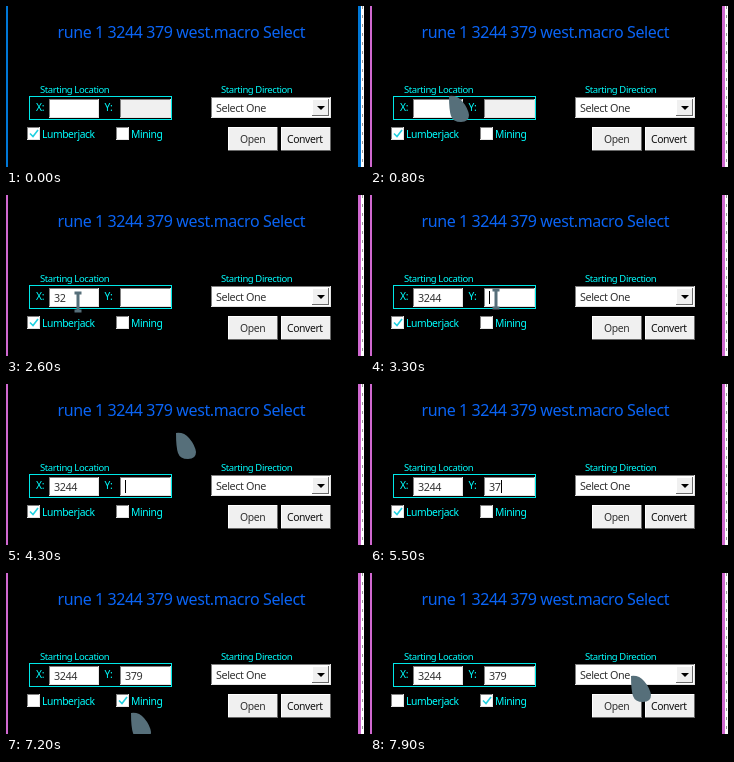
An HTML page that plays this animation: 358 by 161 pixels, repeating every 8 s.

```html
<!DOCTYPE html>
<html>
<head>
<meta charset="utf-8">
<style>
html, body { margin: 0; width: 100%; height: 100%; overflow: hidden; background: #000; }
svg { display: block; width: 358px; height: 161px; font-family: "Noto Sans", "Open Sans", sans-serif; letter-spacing: -.025em; }
rect, line, .edge { shape-rendering: crispEdges; }
.edge { fill: none; }
.label { fill: #00ffff; font-weight: 500; }
.dark { fill: #333; }
</style>
</head>
<body>
<svg viewBox="0 0 358 161">
  <rect width="358" height="161"/>
  <rect x="355" width="3" height="161" fill="#fff"/>
  <line x1="356.5" y1="0" x2="356.5" y2="161" stroke="#999" stroke-dasharray="3 6"/>
  <g id="border"><rect width="2" height="161"/><rect x="352" width="3" height="161"/></g>

  <text x="51.5" y="31.5" font-size="16" fill="#0a64f5">rune 1 3244 379 west.macro Select</text>

  <path class="edge" d="M32 90.5H23.5V113.5H165.5V90.5H32" stroke="#00e8e8"/>
  <g id="boxes"></g>

  <g class="label" font-size="9.5">
    <text x="34" y="87">Starting Location</text>
    <text x="215" y="87">Starting Direction</text>
    <g font-size="10.3">
      <text x="30" y="105">X:</text>
      <text x="98.5" y="105">Y:</text>
      <text x="36" y="132">Lumberjack</text>
      <text x="125" y="132">Mining</text>
    </g>
  </g>

  <g class="dark" font-size="10.8">
    <text id="xText" x="48" y="107"></text>
    <text id="yText" x="119" y="107"></text>
    <text x="210" y="106">Select One</text>
    <text x="234" y="137" font-size="10.4">Open</text>
    <text x="281" y="137" font-size="10.4" fill="#111">Convert</text>
  </g>
  <rect id="caret" y="96" width="1" height="13"/>
  <path d="M311 100h8l-4 4z"/>

  <g fill="none" stroke="#20d0e0" stroke-width="1.6">
    <path id="lumber" d="M24 127.5l3 3 5-6.5"/>
    <path id="mining" d="M113 127.5l3 3 5-6.5"/>
  </g>

  <path id="pointer" fill="#566f7a" d="M0 1Q8 0 13 6Q19 13 20 20Q20 27 12 27Q4 27 2 21Q0 15 0 1Z"/>
  <path id="beam" fill="none" stroke="#566f7a" stroke-width="3" d="M-3.5 -9H3.5M0 -9V9M-3.5 9H3.5"/>
</svg>
<script>
const $ = id => document.getElementById(id);
const show = (id, on) => $(id).style.display = on ? '' : 'none';
const LOOP = 8000, STEP = 100, BLINK = 500;

// a box with a light and a dark edge, raised or sunken
function bevel(x, y, w, h, raised, id = '') {
  const [light, dark] = raised ? ['#fff', '#696969'] : ['#808080', '#e4e4e4'];
  $('boxes').insertAdjacentHTML('beforeend',
    `<rect id="${id}" x="${x}" y="${y}" width="${w}" height="${h}" fill="${raised ? '#f0f0f0' : '#fff'}"/>
     <path class="edge" stroke="${light}" d="M${x + .5} ${y + h}v${.5 - h}h${w - .5}"/>
     <path class="edge" stroke="${dark}" d="M${x} ${y + h - .5}h${w - .5}v${.5 - h}"/>`);
}
bevel(43, 93, 50, 19);
bevel(114, 93, 51, 19, false, 'yBox');
bevel(205, 91, 120, 21);
bevel(306, 93, 17, 17, true);
for (const x of [21, 110]) bevel(x, 121, 13, 13);
for (const x of [222, 275]) bevel(x, 121, 50, 24, true);

// each pointer move: start time, end time, destination
const home = [300, 155];
const moves = [
  [300, 800, 79, 89], [900, 1300, 72, 107], [2700, 3400, 129, 104], [4000, 4400, 177, 38],
  [6000, 6300, 144, 107], [6400, 6800, 119, 128], [7100, 7200, 125, 139], [7200, 7900, 261, 102]
];
const ease = k => k * k * (3 - 2 * k);

function position(t) {
  let [x, y] = home;
  for (const [from, to, toX, toY] of moves) {
    const k = ease(Math.min(1, Math.max(0, (t - from) / (to - from))));
    x += (toX - x) * k;
    y += (toY - y) * k;
  }
  return [Math.round(x), Math.round(y)];
}

// when each field gets the focus, and when its keys are pressed
const fields = [
  { id: 'xText', left: 48, text: '3244', focus: 1300, blur: 3200, keys: [1800, 2100, 2700, 2900] },
  { id: 'yText', left: 119, text: '379', focus: 3200, blur: 6900, keys: [4600, 5200, 5800] }
];

function drawFields(t) {
  let caret = 0;
  for (const { id, left, text, focus, blur, keys } of fields) {
    const pressed = keys.filter(k => k <= t);
    $(id).textContent = text.slice(0, pressed.length);
    const idle = t - Math.max(focus, ...pressed);
    if (t >= focus && t < blur && idle % (2 * BLINK) < BLINK) caret = left + 6 * pressed.length;
  }
  $('caret').setAttribute('x', caret);
  show('caret', caret);
}

function draw(t) {
  drawFields(t);
  $('border').setAttribute('fill', t < 300 ? '#0078d7' : '#d068d0');
  $('yBox').style.fill = t < 1100 ? '#f0f0f0' : '#fff';
  show('lumber', t < 7000);
  show('mining', t >= 6900);

  const [x, y] = position(t);
  const visible = t >= 400 && (t < 5500 || t >= 6000);
  const inField = y > 93 && y < 112 && (x > 43 && x < 93 || x > 114 && x < 165);
  show('pointer', visible && !inField);
  show('beam', visible && inField);
  for (const id of ['pointer', 'beam']) $(id).setAttribute('transform', `translate(${x} ${y})`);
}

const start = performance.now();
function tick() {
  const t = (performance.now() - start) % LOOP;
  draw(Math.floor(t / STEP) * STEP);
  requestAnimationFrame(tick);
}
tick();
</script>
</body>
</html>
```
